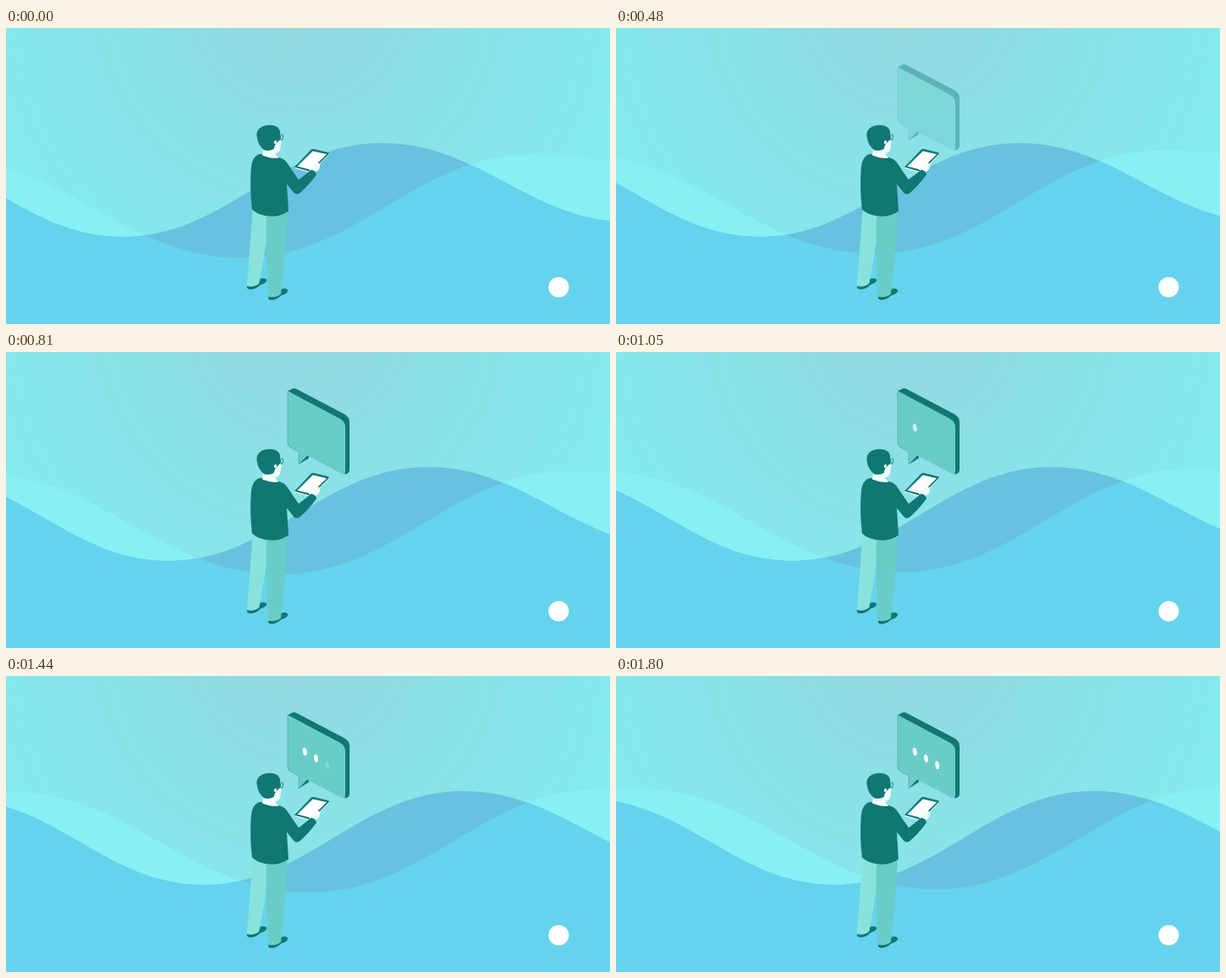
An HTML page with a canvas that plays this animation: 712 px wide and 350 px high, repeating every 2130 ms.

```html
<!DOCTYPE html>
<html lang="en">
<head>
<meta charset="utf-8">
<title>Reading by the waves</title>
<style>
html, body { margin: 0; width: 100%; height: 100%; overflow: hidden; background: #86e8ec; }
canvas { display: block; width: 712px; height: 350px; }
</style>
</head>
<body>
<canvas id="stage" width="712" height="350"></canvas>
<script>
const W = 712, H = 350, LOOP = 2130, STEP = 30, LAST = 60;
const DARK = '#107773', MINT = '#69ccc7', PALE = '#89e3dd', WHITE = '#fff', SKIN = '#f1fcfd';
const ctx = document.getElementById('stage').getContext('2d');

// Alternating crests and troughs, joined by curves with level tangents
const SWELL = [[-447, 247], [-155, 145.5], [137, 247], [443, 136], [735, 229.5], [1030, 136]];
const HAZE = [[-430, 272], [-75, 153], [278, 272], [618, 150], [1000, 210]];

function wave(points, dx, dy) {
  const p = new Path2D();
  points.forEach(([x, y], i) => {
    x += dx;
    y += dy;
    if (!i) return p.moveTo(x, y);
    const px = points[i - 1][0] + dx, py = points[i - 1][1] + dy;
    const h = (x - px) * 0.4;
    p.bezierCurveTo(px + h, py, x - h, y, x, y);
  });
  p.lineTo(W + 400, H);
  p.lineTo(-500, H);
  p.closePath();
  return p;
}

function shape(c, color, d) {
  c.fillStyle = color;
  c.fill(new Path2D(d));
}

function line(c, color, width, d) {
  c.strokeStyle = color;
  c.lineWidth = width;
  c.stroke(new Path2D(d));
}

function oval(c, color, x, y, rx, ry, turn = 0) {
  c.fillStyle = color;
  c.beginPath();
  c.ellipse(x, y, rx, ry, turn, 0, Math.PI * 2);
  c.fill();
}

function layer(paint) {
  const cv = document.createElement('canvas');
  cv.width = W;
  cv.height = H;
  paint(cv.getContext('2d'));
  return cv;
}

const sky = layer(c => {
  const g = c.createRadialGradient(345, -30, 0, 345, -30, 440);
  g.addColorStop(0, '#94d8df');
  g.addColorStop(0.45, '#8ae2e7');
  g.addColorStop(1, '#82edef');
  c.fillStyle = g;
  c.fillRect(0, 0, W, H);
});

const bubble = layer(c => {
  shape(c, DARK, 'M332 46 L338 43.3 Q340.5 42.6 343 44 L399 73.5 Q405 77 405 83 L405 139 Q405 142 403 143.3 L400 144.8 L392 138 L392 82 Z');
  shape(c, DARK, 'M345 133 L357 125.4 L357 121 L348 121 Z');
  const face = 'M332 46 L394 79 Q400 82.5 400 89 L400 141 Q400 146 395 143.6 L355 122.5 L346.5 131.5 L345 133 L345 118 L335 112.5 Q332 111 332 107 Z';
  shape(c, MINT, face);
  line(c, 'rgba(16,119,115,.55)', 0.6, 'M332 46 L332 107 Q332 111 335 112.5 L345 118 L345 133');
});

const man = layer(c => {
  // legs and shoes
  shape(c, DARK, 'M284 305 Q291 304 297 298 Q302 294.5 307 297 Q308 300 304 302 L300 303.5 Q295 309 288 309 Q283.5 309 284 305 Z');
  shape(c, DARK, 'M309 318 Q316 316 322 310 Q328 306.5 332 309.5 Q333 312 329 314.5 L324 316.5 Q319 321.5 313 321.7 Q308.5 321.5 309 318 Z');
  shape(c, PALE, 'M291 212 L284 305 Q292 307.5 298.5 302 L308 247 L312 215 Z');
  shape(c, MINT, 'M307 215 L332 212 Q331 250 324 314.5 Q317 320 309 317.5 Q306 268 307 215 Z');

  // tablet
  shape(c, WHITE, 'M340 165.5 L361 144 L381.5 149 L360 171.5 Z');
  shape(c, DARK, 'M340 164.5 L360 143.6 Q361 142.8 362.5 143.1 L380 147.3 Q381.5 148 380.3 149.5 L360.5 169.4 Q359.5 170.3 358 169.8 Z');
  shape(c, WHITE, 'M343.5 163.6 L361.7 145.6 L378 149.3 L359.5 167.8 Z');

  // hand, neck and face
  shape(c, SKIN, 'M357 167 Q361 164 362 161.5 Q365 158.5 369.5 160 Q371 163 369.3 166.5 Q367.5 169.5 364 170 L365.5 174 L360 171 Z');
  shape(c, SKIN, 'M304 140 L302 151 L312 156 L321 155 L317.5 148 Q322.5 147.5 323.4 143 L324 137 L325 135 L323.5 131 L323 122 L312 121 Z');

  // sweater
  shape(c, DARK, 'M300 149 Q304 148.8 309 151 Q315 153.5 320 153 Q327 153.5 331 159 L345 179.5 L360 167.5 Q365.5 169 366 173.5 Q355 188 346.5 195 Q342.5 198 339 194.5 L331 184.5 L333 216.5 Q324 223.5 311 222.5 Q298 222 290 214.5 Q287 188 289 165 Q290.5 150.5 300 149 Z');
  shape(c, WHITE, 'M303 147 Q310 148.5 317 150.5 L321 154 Q312 154.5 302 150.5 Z');

  // hair and glasses
  shape(c, DARK, 'M296 130 Q293.5 121 302 116.5 Q309 113.4 316.5 115.6 Q323.5 118 323.2 125 L323.5 132 Q320 134 318.2 137 Q316.5 138.5 315.8 143 Q311 145.8 304.5 144.5 Q297 138.5 296 130 Z');
  oval(c, SKIN, 317.5, 135, 1.5, 2.2, 0.2);
  line(c, DARK, 0.8, 'M320 130.5 L324 128.5 M324 126.5 Q326.8 124.6 326.7 128.5 Q326.3 133.3 324.2 132.6 Q322.8 130 324 126.5');
});

function draw(ms) {
  const n = Math.min(LAST, Math.floor(ms / STEP));
  const t = n * STEP;
  const fade = start => Math.max(0, Math.min(1, (t - start) / 300));
  const near = wave(SWELL, n * 2, 0);
  const far = wave(HAZE, n * 5 / 3, -n / 3);

  ctx.drawImage(sky, 0, 0);
  ctx.fillStyle = '#87f0f5';
  ctx.fill(far);
  ctx.fillStyle = '#67c2df';
  ctx.fill(near);
  ctx.save();
  ctx.clip(near);
  ctx.fillStyle = '#64d3ee';
  ctx.fill(far);
  ctx.restore();

  ctx.globalAlpha = fade(360);
  ctx.drawImage(bubble, 0, 0);
  for (let i = 0; i < 3; i++) {
    ctx.globalAlpha = fade(840 + i * 270);
    oval(ctx, WHITE, 352.3 + i * 13.2, 89.5 + i * 8, 2.3, 4.7, -0.2);
  }
  ctx.globalAlpha = 1;

  ctx.drawImage(man, 0, 0);
  oval(ctx, WHITE, 651.5, 306.5, 12, 12);
}

const begin = performance.now();
function tick() {
  draw((performance.now() - begin) % LOOP);
  requestAnimationFrame(tick);
}
tick();
</script>
</body>
</html>
```
